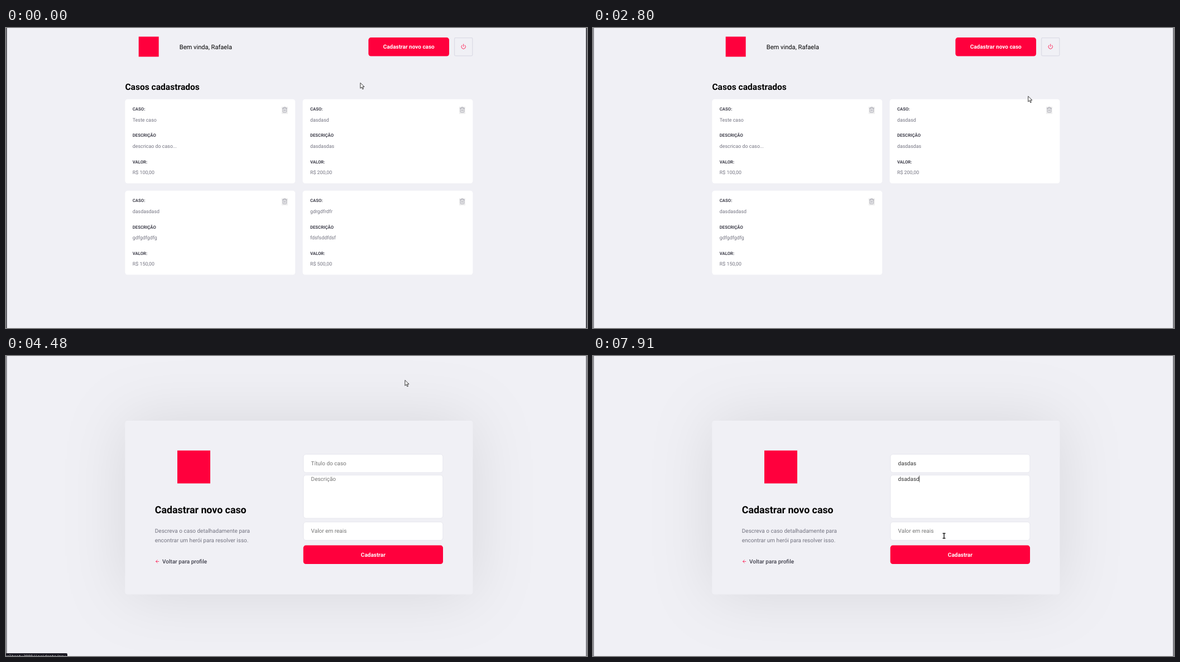
Animation of 1041 by 538 pixels, one loop 8000 ms. Source, as an HTML page:

```html
<!DOCTYPE html>
<html lang="pt-BR">
<head>
<meta charset="utf-8">
<title>Casos cadastrados</title>
<style>
  html, body { margin: 0; height: 100%; overflow: hidden; background: #f0f0f5; }
  svg { display: block; width: 100vw; height: 100vh; }
  text { font-family: Roboto, sans-serif; text-rendering: geometricPrecision; white-space: pre; }
  .mono { font-family: 'DejaVu Sans Mono', monospace; }
  .icon { fill: none; stroke-width: 2; stroke-linecap: round; stroke-linejoin: round; }
  .panel { filter: drop-shadow(0 0 55.6px rgba(0, 0, 0, .1)); }
  .cursor { fill: #fff; stroke: #222; stroke-width: .9; stroke-linejoin: round; }
</style>
</head>
<body>
<svg id="stage" viewBox="0 0 1041 538"></svg>
<script>
const LOOP = 8000, STEP = 70;
const RED = '#ff003d', GREY = '#737380', DARK = '#41414d', LINE = '#dcdce6', HINT = '#757575';
const SCALE = 0.55625; // page pixels to stage pixels
const LEFT = 213.4, WIDTH = 623, GAP = 24 * SCALE, ROUND = 8 * SCALE, BOX = 60 * SCALE;

const rect = (x, y, w, h, fill, extra = '') =>
  `<rect x="${x}" y="${y}" width="${w}" height="${h}" fill="${fill}" ${extra}/>`;

// Text placed by the middle of its line; size in page pixels
const label = (x, middle, size, str, fill = '#000', weight = 400, extra = '') => {
  const px = size * SCALE;
  return `<text x="${x}" y="${middle + px * 0.3415}" font-size="${px}" font-weight="${weight}" fill="${fill}" ${extra}>${str}</text>`;
};

// 24-unit icon drawn around its centre; size in page pixels
const icon = (cx, cy, size, color, d) =>
  `<path class="icon" stroke="${color}" d="${d}" transform="translate(${cx} ${cy}) scale(${size * SCALE / 24}) translate(-12 -12)"/>`;

const TRASH = 'M3 6H21M19 6v14a2 2 0 0 1-2 2H7a2 2 0 0 1-2-2V6m3 0V4a2 2 0 0 1 2-2h4a2 2 0 0 1 2 2v2M10 11v6M14 11v6';
const POWER = 'M18.36 6.64a9 9 0 1 1-12.73 0M12 2v10';
const BACK = 'M19 12H5M12 19l-7-7 7-7';

const button = (x, y, w, str, id) =>
  rect(x, y, w, BOX, RED, `id="${id}" rx="${ROUND}"`) +
  label(x + w / 2, y + BOX / 2 - 0.1, 18, str, '#fff', 700, 'text-anchor="middle"');

const field = (y, h, hint, hintY, id) =>
  rect(533, y, 249.8, h, '#fff', `stroke="${LINE}" stroke-width=".6" rx="${ROUND}"`) +
  label(546.6, hintY, 18, hint, HINT, 400, `id="${id}"`);

const cases = [
  ['Teste caso', 'descricao do caso...', 'R$ 100,00'],
  ['dasdasd', 'dasdasdas', 'R$ 200,00'],
  ['dasdasdasd', 'gdfgdfgdfg', 'R$ 150,00'],
  ['gdrgdfrdfr', 'fdsfsddfdsf', 'R$ 500,00'],
];

function card(values, i) {
  const w = (WIDTH - GAP) / 2, h = 150.7;
  const x = LEFT + (i % 2) * (w + GAP), y = 127.8 + (i >> 1) * (h + GAP);
  const rows = ['CASO:', 'DESCRIÇÃO', 'VALOR:'].map((title, row) => {
    const middle = y + 17.8 + row * 47.24;
    return label(x + GAP, middle, 14, title, DARK, 700) +
           label(x + GAP, middle + 19.2, 16, values[row], GREY);
  });
  return `<g id="card${i}">` + rect(x, y, w, h, '#fff', `rx="${ROUND}"`) + rows.join('') +
    rect(x + w - GAP - 11.1, y + GAP, 11.1, 13, '#efefef') +
    icon(x + w - GAP - 5.55, y + GAP + 5.55, 20, '#a8a8b3', TRASH) + '</g>';
}

const profilePage = '<g id="profile">' +
  rect(237.7, 15.5, 36, 36, RED) +
  label(310.8, 33.8, 20, 'Bem vinda, Rafaela') +
  button(649.4, 17.1, 260 * SCALE, 'Cadastrar novo caso', 'newCase') +
  rect(803.6, 17.7, 32.2, 32.2, 'none', `stroke="${LINE}" stroke-width="1.3" rx="1.8"`) +
  icon(819.7, 33.2, 18, RED, POWER) +
  label(LEFT, 105.3, 28, 'Casos cadastrados', '#000', 700) +
  cases.map(card).join('') + '</g>';

const formPage = '<g id="form">' +
  rect(LEFT, 116, WIDTH, 311.5, '#f0f0f5', `class="panel" rx="${ROUND}"`) +
  rect(307, 169.5, 59, 59, RED) +
  label(266.8, 276.1, 32, 'Cadastrar novo caso', '#000', 700) +
  label(266.8, 313.2, 18, 'Descreva o caso detalhadamente para', GREY) +
  label(266.8, 331, 18, 'encontrar um herói para resolver isso.', GREY) +
  icon(271.2, 368.5, 16, RED, BACK) +
  label(280.1, 368.3, 18, 'Voltar para profile', DARK, 500) +
  field(176.2, 32.8, '', 192.1, 'title') +
  field(213.6, 77.4, '', 220.3, 'details') +
  field(297.7, 32.8, 'Valor em reais', 314, 'amount') +
  button(532.7, 339.6, 450 * SCALE, 'Cadastrar', 'save') +
  rect(0, 0, 0.7, 12, '#333', 'id="caret"') + '</g>';

const edges = '<path id="edges" d="M0 0H1.6V538H0ZM1039 0H1041V538H1039Z"/>';

const statusBar = '<g id="status">' + rect(-4, 533, 114, 10, '#1c1b24', 'rx="2"') +
  '<text class="mono" x="107" y="541.3" font-size="7" text-anchor="end" fill="#ddd">localhost:3000/incidents/new</text></g>';

const BEAM = 'M-2.4-4.4H2.4M0-4.4V4.4M-2.4 4.4H2.4';
const cursors =
  '<path class="cursor" id="arrow" d="M.4.4V10.2L2.7 8 4.4 11.8 6 11.1 4.4 7.4H7.6Z"/>' +
  '<path class="cursor" id="hand" d="M-1 1Q0-.6 1 1V4L4.2 4.6Q5.4 5 5.2 6.5L4.4 10.6H-1.6L-4 7.2Q-4.3 5.6-2.8 6L-1 7Z"/>' +
  `<g id="beam"><path stroke="#fff" stroke-width="2.8" d="${BEAM}"/><path stroke="#333" stroke-width="1.6" d="${BEAM}"/></g>`;

document.getElementById('stage').innerHTML = rect(0, 0, 1041, 538, '#f0f0f5') +
  profilePage + formPage + edges + statusBar + `<g id="pointer">${cursors}</g>`;

const $ = id => document.getElementById(id);
const show = (id, on) => $(id).setAttribute('visibility', on ? 'inherit' : 'hidden');
const progress = (t, from, to) => Math.max(0, Math.min(1, (t - from) / (to - from)));
const easeOut = p => 1 - (1 - p) ** 2;

// Pointer moves: start time, end time, destination; it rests in between
const moves = [
  [490, 700, 722.5, 244],
  [980, 1190, 785, 296], [1190, 1750, 817.5, 312.5],
  [2590, 2800, 779.3, 122], [2800, 3080, 734.5, 89],
  [3360, 3710, 718, 45], [3710, 3920, 714.5, 43],
  [4690, 5320, 621, 184],
  [6440, 6720, 626, 273],
  [7560, 7910, 629, 322.5],
];

function pointerAt(t) {
  let x = 634.5, y = 98;
  for (const [from, to, toX, toY] of moves) {
    const k = easeOut(progress(t, from, to));
    x += (toX - x) * k;
    y += (toY - y) * k;
  }
  return [x, y];
}

const inside = (x, y, left, top, right, bottom) => x > left && x < right && y > top && y < bottom;

function cursorKind(t, x, y) {
  if (t >= 4480) return inside(x, y, 532, 176, 783, 331) ? 'beam' : 'arrow';
  const overTrash = t < 2660 && inside(x, y, 811.8, 305, 823, 318);
  return overTrash || inside(x, y, 649, 17, 794, 50.5) ? 'hand' : 'arrow';
}

// Types a word at an even pace over its hint and returns its width
function type(id, t, word, first, pace, hint) {
  const typed = word.slice(0, Math.max(0, Math.floor((t - first) / pace) + 1));
  $(id).textContent = typed || hint;
  $(id).setAttribute('fill', typed ? '#333' : HINT);
  return typed ? $(id).getComputedTextLength() : 0;
}

function render(t) {
  const onForm = t >= 4480, inDetails = t >= 7070;
  show('profile', !onForm);
  show('form', onForm);
  show('card3', t < 2380);
  $('edges').setAttribute('fill', t < 2170 ? '#46464c' : '#7e7e84');

  const hover = progress(t, 3500, 3780);
  $('newCase').setAttribute('fill', `rgb(${255 - 25 * hover},0,${61 - 6 * hover})`);
  $('status').setAttribute('opacity', progress(t, 3990, 4200) * progress(t, 4900, 4690));

  const titleWidth = type('title', t, 'dasdas', 6230, 84, 'Título do caso');
  const detailsWidth = type('details', t, 'dsadasd', 7280, 105, 'Descrição');
  show('caret', t >= 5810);
  $('caret').setAttribute('x', 546.4 + (inDetails ? detailsWidth : titleWidth));
  $('caret').setAttribute('y', inDetails ? 214.4 : 186.2);

  const [x, y] = pointerAt(t), kind = cursorKind(t, x, y);
  $('pointer').setAttribute('transform', `translate(${x} ${y})`);
  for (const id of ['arrow', 'hand', 'beam']) show(id, id === kind);
}

const start = performance.now();
function tick() {
  const t = (performance.now() - start) % LOOP;
  render(Math.floor(t / STEP) * STEP);
  requestAnimationFrame(tick);
}
tick();
</script>
</body>
</html>
```
